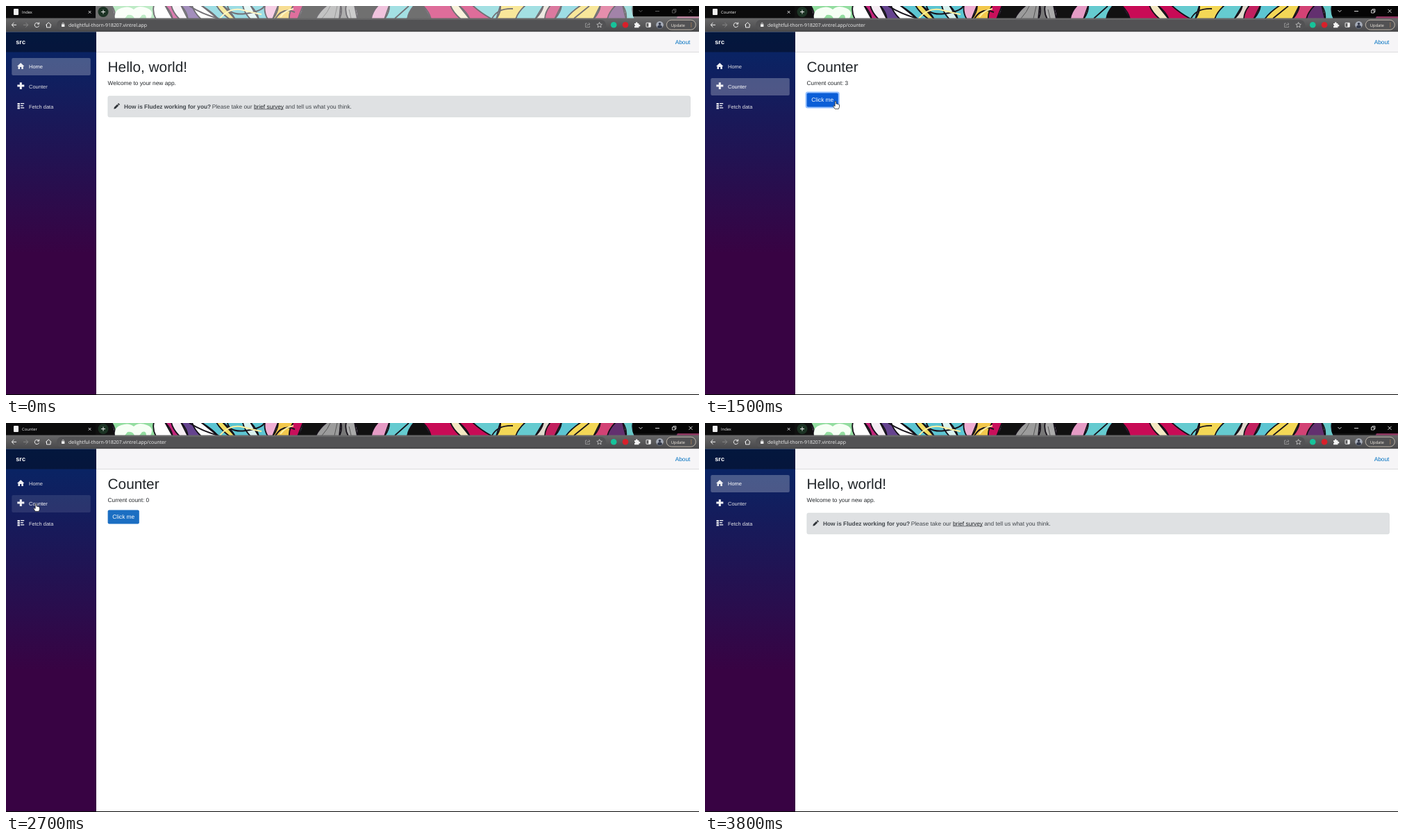
An HTML page with a canvas for the animation above (4.1 s loop, 998 px wide and 561 px high).

```html
<!DOCTYPE html>
<html lang="en">
<head>
<meta charset="utf-8">
<title>Demo app</title>
<style>
  html, body { margin: 0; width: 100%; height: 100%; overflow: hidden; background: #fff; }
  canvas { display: block; }
</style>
</head>
<body>
<canvas id="stage" width="998" height="561"></canvas>
<script>
const ctx = document.getElementById('stage').getContext('2d');
const LOOP = 4100, STEP = 100;
const SANS = '"Liberation Sans", Arial, sans-serif';
const UI = '"Open Sans", "Noto Sans", sans-serif';
const INK = '#212529';
const HOST = 'delightful-thorn-918207.vintrel.app';
const PAGE_TOP = 37.4, LEFT = 146.6;

const ROUTES = {
  home: { title: 'Index', path: '' },
  counter: { title: 'Counter', path: '/counter' },
  fetch: { title: 'Weather forecast', path: '/fetchdata' }
};
const NAV = [['home', 'Home', 75], ['counter', 'Counter', 104], ['fetch', 'Fetch data', 133]];
const BUTTON = { x: 146.6, y: 125.6, w: 45.2, h: 19.8 };

// Each entry holds from its tick until the next one.
const STATES = [
  { at: 0, page: 'home', route: 'home' },
  { at: 9, page: 'counter', route: 'home', count: 0 },
  { at: 10, page: 'counter', route: 'counter', count: 0 },
  { at: 13, page: 'counter', route: 'counter', count: 1 },
  { at: 14, page: 'counter', route: 'counter', count: 2 },
  { at: 15, page: 'counter', route: 'counter', count: 3 },
  { at: 22, page: 'loading', route: 'fetch' },
  { at: 23, page: 'table', route: 'fetch' },
  { at: 27, page: 'counter', route: 'counter', count: 0 },
  { at: 30, page: 'counter', route: 'counter', count: 1 },
  { at: 32, page: 'counter', route: 'counter', count: 2 },
  { at: 33, page: 'counter', route: 'counter', count: 3 },
  { at: 37, page: 'home', route: 'home' }
];
const ACTIVATED = 4;

// tick, x, y of the pointer's hot spot
const POINTER = [
  [2, 170, 300], [5, 45, 86], [6, 43, 83.5], [7, 43, 84], [9, 43, 116.5], [10, 43, 116.5],
  [12, 168, 133], [15, 188, 137.5], [18, 188, 137.5], [21, 86, 146.5], [25, 86, 146.5],
  [27, 43, 116.5], [28, 43, 116.5], [30, 168, 131.5], [33, 168, 131.5], [36, 43, 85], [37.9, 120, 290]
];

// Colour with the top and bottom x where each graffiti patch starts.
const PATCHES = [
  ['#101010', 128, 128], ['#93dda0', 152, 157], ['#fff', 213, 216], ['#c2247a', 229, 240],
  ['#f6eef4', 238, 250], ['#65438f', 252, 262], ['#fff', 268, 281], ['#5cc5d2', 281, 306],
  ['#f0dc62', 303, 322], ['#5cc5d2', 312, 330], ['#d9f2ef', 341, 352], ['#5cc5d2', 352, 364],
  ['#efafd3', 373, 377], ['#f3c84b', 392, 384], ['#c90f5b', 414, 408], ['#111', 428, 420],
  ['#9b9b9b', 462, 446], ['#777', 482, 480], ['#aaa', 490, 493], ['#111', 502, 506],
  ['#e59bc5', 536, 526], ['#65cbd0', 552, 545], ['#111', 588, 578], ['#c80b56', 600, 612],
  ['#f3e8c3', 640, 655], ['#c80b56', 652, 668], ['#65cbd0', 672, 700], ['#f3d756', 712, 706],
  ['#65cbd0', 748, 734], ['#e0d9cd', 774, 762], ['#c2205f', 784, 776], ['#5cc5d2', 800, 790],
  ['#f3d756', 828, 806], ['#d34275', 856, 846], ['#63306f', 878, 866], ['#67c8c8', 888, 893],
  ['#111', 903, 906], ['#8d355f', 968, 964]
];

const FORECAST = [[6, 1, 'Freezing'], [7, 14, 'Bracing'], [8, -13, 'Freezing'], [9, -16, 'Balmy'], [10, -2, 'Chilly']];

function rect(x, y, w, h, fill) {
  ctx.fillStyle = fill;
  ctx.fillRect(x, y, w, h);
}
function box(x, y, w, h, r, fill, line, width = 0.6) {
  ctx.beginPath();
  ctx.roundRect(x, y, w, h, r);
  if (fill) { ctx.fillStyle = fill; ctx.fill(); }
  if (line) { ctx.strokeStyle = line; ctx.lineWidth = width; ctx.stroke(); }
}
function disc(x, y, r, fill) {
  ctx.beginPath();
  ctx.arc(x, y, r, 0, Math.PI * 2);
  ctx.fillStyle = fill;
  ctx.fill();
}
function text(str, x, y, size, color, family = SANS, style = '') {
  ctx.font = `${style} ${size}px ${family}`;
  ctx.fillStyle = color;
  ctx.fillText(str, x, y);
}
const body = (str, x, y, style) => text(str, x, y, 8.32, INK, SANS, style);
function shape(d, x, y, fill, line, width = 1) {
  const path = new Path2D(d);
  ctx.save();
  ctx.translate(x, y);
  if (fill) { ctx.fillStyle = fill; ctx.fill(path); }
  if (line) { ctx.strokeStyle = line; ctx.lineWidth = width; ctx.stroke(path); }
  ctx.restore();
}
function gradient(top, bottom, ...stops) {
  const fill = ctx.createLinearGradient(0, top, 0, bottom);
  for (const [at, color] of stops) fill.addColorStop(at, color);
  return fill;
}

function drawGraffiti(active) {
  ctx.save();
  ctx.beginPath();
  ctx.rect(128, 0, 870, 18);
  ctx.clip();
  PATCHES.forEach(([color, top, bottom], i) => {
    const [, nextTop, nextBottom] = PATCHES[i + 1] || ['', 1000, 1000];
    const bend = i % 2 ? 4 : -4;
    shape(`M${top} -1Q${(top + bottom) / 2 + bend} 9 ${bottom} 19H${nextBottom}L${nextTop} -1Z`, 0, 0, color, '#141018', 1.8);
  });
  // pale bubbles, then loose outlines and highlights
  shape('M157 18Q155 6 166 3Q177 -1 184 5Q191 -2 203 3Q214 7 208 18H202Q202 11 196 13L192 18H185Q183 12 175 13L171 18Z', 0, 0, '#f6fff5');
  shape('M264 0Q283 12 306 18M319 0Q322 14 345 11T372 0M388 18Q399 1 416 9', 0, 0, null, '#17131b', 2);
  shape('M308 18Q322 1 342 6T368 12M395 16Q402 6 414 4', 0, 0, null, '#fff0a0', 2);
  shape('M560 18L580 0M700 18Q708 3 730 4M818 18L840 0', 0, 0, null, '#17131b', 1.8);
  shape('M455 18Q464 8 467 0M473 18L477 0M497 18L494 5', 0, 0, null, '#555', 1);
  if (!active) rect(128, 0, 870, 18, 'rgba(255,255,255,.4)');
  ctx.restore();

  disc(140, 8.5, 7.5, '#1c3324');
  shape('M137 8.5h6M140 5.5v6', 0, 0, null, '#fff', 0.9);
  rect(903, 0, 95, 15, '#050505');
  const tone = active ? '#eee' : '#666';
  shape('M911.5 6l2.5 2.5l2.5 -2.5M935 7.5h6M983.5 4.8l5 5M988.5 4.8l-5 5', 0, 0, null, tone, 0.9);
  shape('M959.5 6h4v4h-4ZM961 6v-1.3h4v4h-1.3', 0, 0, null, tone, 0.8);
}

function drawBrowser(route, active) {
  drawGraffiti(active);
  rect(0, 0, 129, 19, '#0b0b0c');
  box(11, 4, 7, 9, 1, '#f2f2f2');
  text(route.title, 23, 11, 5.8, '#f1f1f1', UI);
  shape('M118.8 7l3.6 3.6M122.4 7l-3.6 3.6', 0, 0, null, '#eee', 0.9);

  rect(0, 17.5, 998, PAGE_TOP - 17.5, gradient(17, 37, [0, '#69696a'], [1, '#48484a']));
  box(73, 20, 791, 14.5, 7.2, '#525254');

  shape('M15 27.3H8.5M11.5 24l-3.3 3.3l3.3 3.3', 0, 0, null, '#f2f2f2', 1);
  shape('M25 27.3h6.5M28.5 24l3.3 3.3l-3.3 3.3', 0, 0, null, '#868686', 1);
  shape('M47.1 25.6A3.2 3.2 0 1 0 47.5 28.5M47.7 23.5v2.6h-2.6', 0, 0, null, '#f2f2f2', 1);
  shape('M57.3 27.5l4 -3.7l4 3.7M58.5 27v3.9h5.6V27', 0, 0, null, '#f2f2f2', 1);
  box(80, 26.3, 4.4, 3.7, 0.5, '#eee');
  shape('M81 26.5v-1a1.2 1.2 0 0 1 2.4 0v1', 0, 0, null, '#eee', 0.7);
  text(HOST + route.path, 90, 29.7, 6.95, '#f4f4f4', UI);

  shape('M837 25h-2.5v5.5h6v-1.8M836.5 29q.2-3 4-3M839 24l2 2l-2 2', 0, 0, null, '#aaa', 0.7);
  shape('M0 -3.8L1.1 -1.3L3.8 -1L1.8 .8L2.4 3.5L0 2.1L-2.4 3.5L-1.8 .8L-3.8 -1L-1.1 -1.3Z', 854.6, 27.3, null, '#ddd', 0.7);
  disc(875.2, 27.3, 4.3, '#16c39a');
  disc(892, 27.3, 4.3, '#d8202b');
  shape('M905 25h2a1.3 1.3 0 1 1 2.4 0h2v2a1.3 1.3 0 1 1 0 2.2v2H905v-2.1a1 1 0 1 0 0-2.1Z', 0, 0, '#f2f2f2');
  box(922, 24.3, 6.3, 6, 0.5, null, '#f2f2f2', 0.9);
  rect(925.3, 24.5, 3, 5.6, '#f2f2f2');
  disc(941.5, 27.3, 5.3, '#a6acb8');
  disc(941.5, 25.7, 1.8, '#343a4a');
  shape('M938 31q0-3.5 3.5-3.5t3.5 3.5q-3.5 2.4-7 0Z', 0, 0, '#343a4a');
  box(951.3, 20.2, 42, 14, 7, '#525254', '#d7cdbd', 0.8);
  text('Update', 957.8, 29.5, 5.85, '#f5eee4', UI);
  for (const y of [24.8, 27.3, 29.8]) disc(986.8, y, 0.65, '#e9a15b');
}

function drawNavIcon(id, y) {
  if (id === 'home') shape('M16 87l5.2 -5l5.2 5h-1.6v4.1h-2.5v-3h-2.3v3h-2.5V87Z', 0, y - 75, '#f0f0f4');
  else if (id === 'counter') shape('M19.8 110.2h3v3.3h3.5v3h-3.5v3.5h-3v-3.5h-3.5v-3h3.5Z', 0, y - 104, '#f0f0f4');
  else for (let row = 0; row < 3; row++) {
    rect(16.5, y + 7 + row * 3.1, 3.4, 2.3, '#f0f0f4');
    rect(21, y + 7 + row * 3.1, row === 1 ? 4 : 5.2, 1.3, '#f0f0f4');
  }
}

function drawSidebar(routeId, hovered) {
  rect(0, PAGE_TOP, 130, 560 - PAGE_TOP, gradient(PAGE_TOP, 560, [0, 'rgb(5,39,103)'], [0.61, '#380343']));
  rect(0, PAGE_TOP, 130, 29.1, 'rgba(0,0,0,.4)');
  text('src', 14.3, 55, 9.15, '#fff', SANS, 'bold');
  for (const [id, label, y] of NAV) {
    const lit = id === hovered || id === routeId;
    if (lit) box(8.3, y, 113.5, 25, 2, `rgba(255,255,255,${id === hovered ? 0.1 : 0.25})`);
    drawNavIcon(id, y);
    text(label, 33, y + 15, 7.49, lit ? '#fff' : '#e2e2e6');
  }
}

const heading = str => text(str, LEFT, 95.1, 20.8, INK);
const lead = str => body(str, LEFT, 113.8);

function drawHome() {
  heading('Hello, world!');
  lead('Welcome to your new app.');
  box(146.9, 130, 838.5, 30, 2, '#dfe1e3', '#cfd3d5');
  shape('M155.3 148.6l.6 -2.5l4.3 -4.3l2 2l-4.3 4.3ZM160.8 141.2l1.2 -1.2l2 2l-1.2 1.2Z', 0, 0, '#303438');
  const ink = '#41464b';
  text('How is Fludez working for you?', 170, 147.6, 8.32, ink, SANS, 'bold');
  text('Please take our', 296.7, 147.6, 8.32, ink);
  text('brief survey', 357, 147.6, 8.32, INK);
  rect(357, 148.6, 42.8, 0.6, INK);
  text('and tell us what you think.', 402.2, 147.6, 8.32, ink);
}

function drawCounter({ count }, hovered) {
  const { x, y, w, h } = BUTTON;
  heading('Counter');
  lead('Current count: ' + count);
  if (count) box(x - 2, y - 2, w + 4, h + 4, 3.5, 'rgba(49,132,253,.5)');
  box(x, y, w, h, 2, count || hovered === 'button' ? '#0b5ed7' : '#1b6ec2');
  text('Click me', 153.3, 138.3, 8.32, '#fff');
}

function drawWeather({ page }) {
  heading('Weather forecast');
  lead('This component demonstrates fetching data from the server.');
  if (page === 'loading') return body('Loading...', LEFT, 134.6, 'italic');
  const rows = FORECAST.map(([day, c, word]) => [`5/${day}/2018`, c, 32 + Math.trunc(c / 0.5556), word]);
  [['Date', 'Temp. (C)', 'Temp. (F)', 'Summary'], ...rows].forEach((row, i) => {
    const y = 125.5 + i * 21.3;
    row.forEach((cell, col) => body(String(cell), [151, 342, 556, 770][col], y + 13.2, i ? '' : 'bold'));
    rect(147, y + 20.8, 838.5, 0.6, i ? '#dee2e6' : INK);
  });
}

function pointerAt(tick) {
  const i = POINTER.findIndex(([at]) => at > tick);
  if (i < 1) return null;
  const [t0, x0, y0] = POINTER[i - 1], [t1, x1, y1] = POINTER[i];
  const p = (tick - t0) / (t1 - t0), ease = p * p * (3 - 2 * p);
  return { x: x0 + (x1 - x0) * ease, y: y0 + (y1 - y0) * ease };
}

function hitTest(p, page) {
  if (!p) return null;
  const inside = (x, y, w, h) => p.x >= x && p.x <= x + w && p.y >= y && p.y <= y + h;
  const item = NAV.find(([, , y]) => inside(8, y, 114, 25));
  if (item) return item[0];
  return page === 'counter' && inside(BUTTON.x, BUTTON.y, BUTTON.w, BUTTON.h) ? 'button' : null;
}

function drawPointer({ x, y }, hand) {
  const d = hand
    ? 'M-.9 .3Q0 -.8 .9 .3V3.6Q1.9 3 2.5 4Q3.5 3.4 4.1 4.5Q5.2 4.2 5.5 5.3V8L4.4 10.9H-.9L-3.2 7.3Q-3.3 5.8 -2 6.2L-.9 7.1Z'
    : 'M0 0V9.3L2.2 7.3L3.6 10.6L5 10L3.6 6.8H6.5Z';
  shape(d, x, y, '#fff', '#111', 0.7);
}

function draw(tick) {
  const state = STATES.findLast(s => s.at <= tick);
  const pointer = pointerAt(tick);
  const hovered = hitTest(pointer, state.page);
  rect(0, 0, 998, 561, '#fff');
  drawBrowser(ROUTES[state.route], tick >= ACTIVATED);
  drawSidebar(state.route, hovered);
  rect(130, PAGE_TOP, 868, 29.1, '#f6f5f7');
  rect(130, 66, 868, 0.7, '#d0d0d2');
  text('About', 963.7, 54.6, 8.32, '#0071c1');
  if (state.page === 'home') drawHome();
  else if (state.page === 'counter') drawCounter(state, hovered);
  else drawWeather(state);
  rect(0, 560, 998, 1, '#080808');
  if (pointer) drawPointer(pointer, hovered);
}

ctx.textRendering = 'geometricPrecision';
const start = performance.now();
function loop() {
  draw(Math.floor(((performance.now() - start) % LOOP) / STEP));
  requestAnimationFrame(loop);
}
loop();
</script>
</body>
</html>
```
